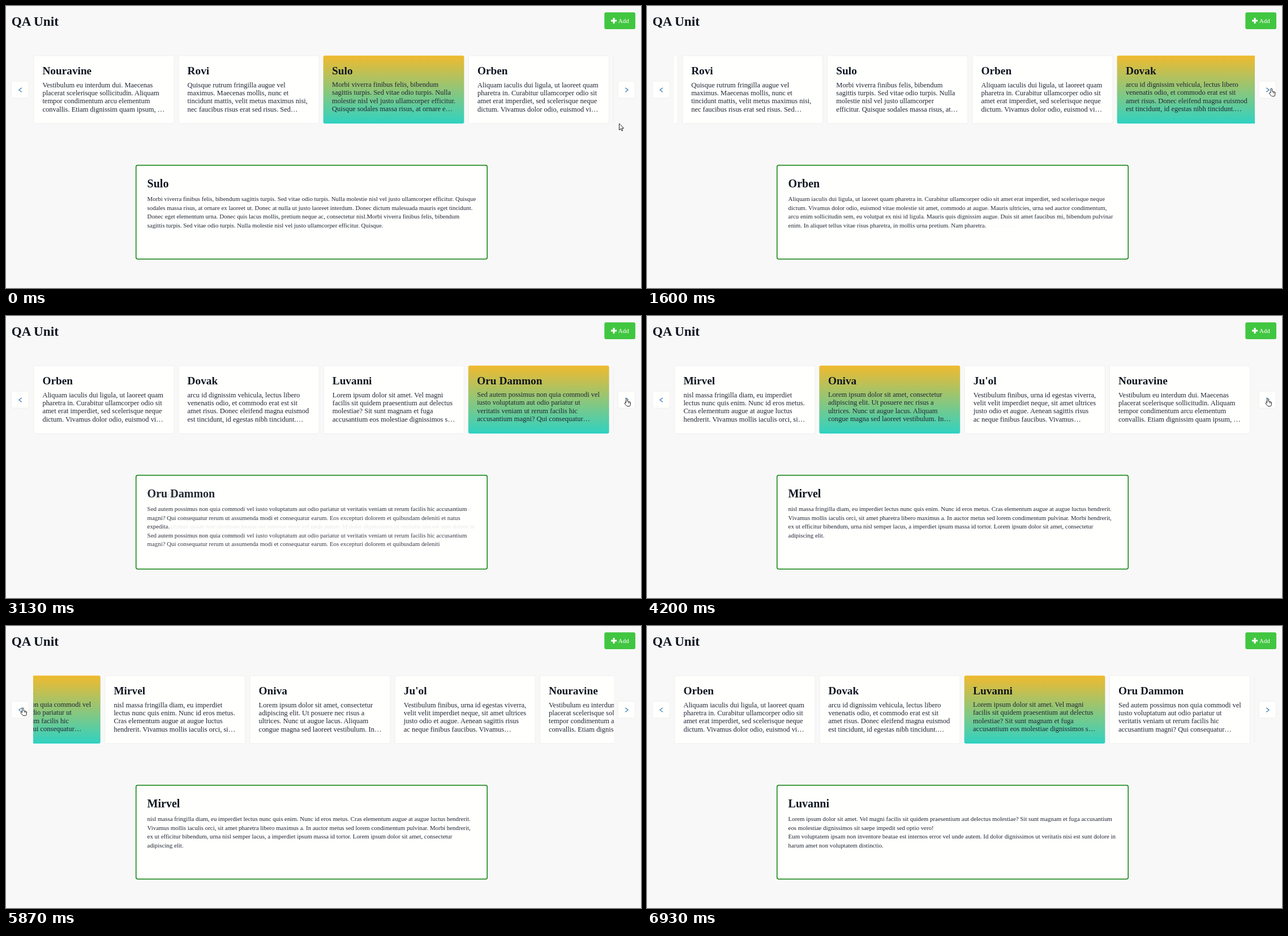
An HTML page for the animation above (6.99 s loop, 1122 by 499 pixels).

```html
<!DOCTYPE html>
<html lang="en">
<head>
<meta charset="utf-8">
<title>Card carousel</title>
<style>
html, body { margin: 0; width: 100%; height: 100%; overflow: hidden; background: #f8f8f8; }
svg { display: block; width: 1122px; height: 499px; font-family: "Liberation Serif", "Times New Roman", serif; }
text { fill: #202535; }
.title { font-weight: bold; fill: #0e1520; }
.body { font-size: 12.47px; }
.note { font-size: 10.87px; }
.box { fill: #fffffd; stroke: #efefef; }
.arrow { fill: none; stroke: #2c73b8; stroke-width: 1.1; }
.cursor { fill: #fff; stroke: #222; stroke-linejoin: round; }
</style>
</head>
<body>
<svg viewBox="0 0 1122 499">
  <defs>
    <linearGradient id="glow" x2="0" y2="1">
      <stop stop-color="#f0ba2f"/><stop offset="1" stop-color="#2fd2c2"/>
    </linearGradient>
    <clipPath id="view"><rect x="48" y="80" width="1026" height="136"/></clipPath>
  </defs>
  <rect width="1122" height="499" fill="#f8f8f8"/>
  <text class="title" x="9.8" y="35" font-size="23.2">QA Unit</text>
  <rect x="1057.3" y="11.2" width="54.7" height="29.8" rx="3" fill="#41c641"/>
  <path d="M1074 21v10M1069 26h10" stroke="#fff" stroke-width="3"/>
  <text x="1081.8" y="30" font-size="11" style="fill:#fff">Add</text>
  <g clip-path="url(#view)"><g id="track"></g></g>
  <rect class="box" x="9.5" y="133" width="30.5" height="30" rx="3"/>
  <path class="arrow" d="M27.8 144.8l-5 3.7 5 3.7"/>
  <rect class="box" x="1081" y="133" width="30.5" height="30" rx="3"/>
  <path class="arrow" d="M1094.2 144.8l5 3.7-5 3.7"/>
  <rect x="229.75" y="281.75" width="620.5" height="166" rx="3" fill="#fffffd" stroke="#0a800c" stroke-width="1.5"/>
  <g id="panel"></g>
  <g id="cursor">
    <path class="cursor" id="pointer" d="M0 0V11.5l2.7-2.5 1.8 4 1.8-.8-1.8-3.9h3.6z"/>
    <g id="hand" transform="translate(-4.3 -1)">
      <path class="cursor" d="M3 9V2.2a1.3 1.3 0 0 1 2.6 0V6l4 .9q1.6.4 1.5 2l-.6 4q-.2 1.8-1.6 1.8H5.5q-1 0-1.6-.9L.6 9.8q-.4-1 .5-1.4.9-.3 1.9.6z"/>
      <path class="cursor" d="M7.4 7v2.4M9.3 7.4v2.2" stroke-width=".8"/>
    </g>
  </g>
</svg>
<script>
const LOOP = 6990, STEP = LOOP / 105; // the picture advances 15 times a second
const PITCH = 256.2, FADE_DELAY = 30, FADE = 240, SCROLL = 288;

// name, card lines, full lines, card lines when picked (if they wrap differently)
const people = [
  ['Nouravine', 'Vestibulum eu interdum dui. Maecenas|placerat scelerisque sollicitudin. Aliquam|tempor condimentum arcu elementum|convallis. Etiam dignissim quam ipsum, …'],
  ['Rovi', 'Quisque rutrum fringilla augue vel|maximus. Maecenas mollis, nunc et|tincidunt mattis, velit metus maximus nisi,|nec faucibus risus erat sed risus. Sed…'],
  ['Sulo', 'Morbi viverra finibus felis, bibendum|sagittis turpis. Sed vitae odio turpis. Nulla|molestie nisl vel justo ullamcorper|efficitur. Quisque sodales massa risus, at…',
    'Morbi viverra finibus felis, bibendum sagittis turpis. Sed vitae odio turpis. Nulla molestie nisl vel justo ullamcorper efficitur. Quisque|sodales massa risus, at ornare ex laoreet ut. Donec at nulla ut justo laoreet interdum. Donec dictum malesuada mauris eget tincidunt.|Donec eget elementum urna. Donec quis lacus mollis, pretium neque ac, consectetur nisl.Morbi viverra finibus felis, bibendum|sagittis turpis. Sed vitae odio turpis. Nulla molestie nisl vel justo ullamcorper efficitur. Quisque.',
    'Morbi viverra finibus felis, bibendum|sagittis turpis. Sed vitae odio turpis. Nulla|molestie nisl vel justo ullamcorper efficitur.|Quisque sodales massa risus, at ornare e…'],
  ['Orben', 'Aliquam iaculis dui ligula, ut laoreet quam|pharetra in. Curabitur ullamcorper odio sit|amet erat imperdiet, sed scelerisque neque|dictum. Vivamus dolor odio, euismod vi…',
    'Aliquam iaculis dui ligula, ut laoreet quam pharetra in. Curabitur ullamcorper odio sit amet erat imperdiet, sed scelerisque neque|dictum. Vivamus dolor odio, euismod vitae molestie sit amet, commodo at augue. Mauris ultricies, urna sed auctor condimentum,|arcu enim sollicitudin sem, eu volutpat ex nisi id ligula. Mauris quis dignissim augue. Duis sit amet faucibus mi, bibendum pulvinar|enim. In aliquet tellus vitae risus pharetra, in mollis urna pretium. Nam pharetra.'],
  ['Dovak', 'arcu id dignissim vehicula, lectus libero|venenatis odio, et commodo erat est sit|amet risus. Donec eleifend magna euismod|est tincidunt, id egestas nibh tincidunt.…',
    'arcu id dignissim vehicula, lectus libero venenatis odio, et commodo erat est sit amet risus. Donec eleifend magna euismod|est tincidunt, id egestas nibh tincidunt. Mauris quis lacus mollis, pretium neque ac, consectetur nisl. Sed vitae odio turpis, ut|laoreet quam pharetra in. Duis sit amet faucibus mi, bibendum pulvinar enim. Nulla molestie nisl vel justo ullamcorper|efficitur. In aliquet tellus vitae risus pharetra, in mollis urna pretium. Nam vel faucibus augue.'],
  ['Luvanni', 'Lorem ipsum dolor sit amet. Vel magni|facilis sit quidem praesentium aut delectus|molestiae? Sit sunt magnam et fuga|accusantium eos molestiae dignissimos s…',
    'Lorem ipsum dolor sit amet. Vel magni facilis sit quidem praesentium aut delectus molestiae? Sit sunt magnam et fuga accusantium|eos molestiae dignissimos sit saepe impedit sed optio vero!|Eum voluptatem ipsam non inventore beatae est internos error vel unde autem. Id dolor dignissimos ut veritatis nisi est sunt dolore in|harum amet non voluptatem distinctio.'],
  ['Oru Dammon', 'Sed autem possimus non quia commodi vel|iusto voluptatum aut odio pariatur ut|veritatis veniam ut rerum facilis hic|accusantium magni? Qui consequatur…',
    'Sed autem possimus non quia commodi vel iusto voluptatum aut odio pariatur ut veritatis veniam ut rerum facilis hic accusantium|magni? Qui consequatur rerum ut assumenda modi et consequatur earum. Eos excepturi dolorem et quibusdam deleniti et natus|expedita.|Sed autem possimus non quia commodi vel iusto voluptatum aut odio pariatur ut veritatis veniam ut rerum facilis hic accusantium|magni? Qui consequatur rerum ut assumenda modi et consequatur earum. Eos excepturi dolorem et quibusdam deleniti'],
  ['Mirvel', 'nisl massa fringilla diam, eu imperdiet|lectus nunc quis enim. Nunc id eros metus.|Cras elementum augue at augue luctus|hendrerit. Vivamus mollis iaculis orci, si…',
    'nisl massa fringilla diam, eu imperdiet lectus nunc quis enim. Nunc id eros metus. Cras elementum augue at augue luctus hendrerit.|Vivamus mollis iaculis orci, sit amet pharetra libero maximus a. In auctor metus sed lorem condimentum pulvinar. Morbi hendrerit,|ex ut efficitur bibendum, urna nisl semper lacus, a imperdiet ipsum massa id tortor. Lorem ipsum dolor sit amet, consectetur|adipiscing elit.'],
  ['Oniva', 'Lorem ipsum dolor sit amet, consectetur|adipiscing elit. Ut posuere nec risus a|ultrices. Nunc ut augue lacus. Aliquam|congue magna sed laoreet vestibulum. In…',
    'Lorem ipsum dolor sit amet, consectetur adipiscing elit. Ut posuere nec risus a ultrices. Nunc ut augue lacus. Aliquam congue magna|sed laoreet vestibulum. In pharetra purus ultrices arcu scelerisque, eu venenatis ligula ultricies. Lorem ipsum dolor sit amet,|consectetur adipiscing elit. Mauris vel massa sed lorem pellentesque ornare pulvinar quis lacus. Donec ut lacus nec massa cursus|egestas ac nec dui. In in venenatis nunc. Integer volutpat, libero nec tristique hendrerit.'],
  ["Ju'ol", 'Vestibulum finibus, urna id egestas viverra,|velit velit imperdiet neque, sit amet ultrices|justo odio et augue. Aenean sagittis risus|ac neque finibus faucibus. Vivamus…']
];

// time, selected card, first visible card
const clicks = [
  [-999, 2, 0], [980, 3, 0], [1548, 4, 3], [2300, 5, 3], [2905, 6, 3],
  [3540, 7, 7], [4180, 8, 7], [5250, 7, 7], [5840, 6, 3], [6520, 5, 3]
];

// time, x, y of the cursor's hot spot
const path = [
  [0, 1083.5, 208], [70, 1083.5, 208], [600, 1103.3, 146], [1730, 1103.3, 146],
  [2200, 1096.8, 146], [4450, 1096.8, 146], [5050, 29.8, 145], [LOOP, 29.8, 145]
];
const CURSOR_END = 6870;

const $ = id => document.getElementById(id);
const clamp = v => Math.max(0, Math.min(1, v));
const smooth = p => p * p * (3 - 2 * p);
const easeOut = p => 1 - (1 - p) ** 2;
const mix = (a, b, p) => a + (b - a) * p;

function add(parent, tag, attrs = {}, content = '') {
  const el = document.createElementNS('http://www.w3.org/2000/svg', tag);
  for (const k in attrs) el.setAttribute(k, attrs[k]);
  el.textContent = content;
  return parent.appendChild(el);
}

function addLines(parent, lines, cls, x, y, step) {
  lines.split('|').forEach((s, i) => add(parent, 'text', { class: cls, x, y: y + i * step }, s));
}

function makeFace(parent, name, lines, lit) {
  const g = add(parent, 'g');
  const d = lit ? 0.7 : 0;
  add(g, 'rect', lit
    ? { x: 0.2, y: 87.7, width: 248.8, height: 120.4, rx: 3, fill: 'url(#glow)' }
    : { x: 0.8, y: 88, width: 248, height: 120, rx: 2, class: 'box' });
  add(g, 'text', { class: 'title', 'font-size': 19.3, x: 16.4 - d, y: 121.4 - d }, name);
  addLines(g, lines, 'body', 16.4 - d, 143.8 - d, 14.24);
  return g;
}

const cards = Array.from({ length: 11 }, (_, i) => {
  const [name, brief, , litBrief] = people[i % people.length];
  const g = add($('track'), 'g', { transform: `translate(${48 + i * PITCH} 0)` });
  return [makeFace(g, name, brief, false), makeFace(g, name, litBrief || brief, true)];
});

const notes = people.map(([name, , full]) => {
  const g = add($('panel'), 'g');
  add(g, 'text', { class: 'title', 'font-size': 20.05, x: 249.6, y: 321.3 }, name);
  if (full) addLines(g, full, 'note', 249.6, 345, 15.6);
  return g;
});

const show = (el, on) => { el.style.display = on ? '' : 'none'; };

function drawCursor(t) {
  const i = path.findIndex(k => k[0] > t);
  const [a, b] = [path[i - 1], path[i]];
  const p = smooth((t - a[0]) / (b[0] - a[0]));
  const x = mix(a[1], b[1], p), y = mix(a[2], b[2], p);
  const over = y < 163 && (x < 40 || x > 1081);
  $('cursor').setAttribute('transform', `translate(${x} ${y})`);
  show($('cursor'), t < CURSOR_END);
  show($('hand'), over);
  show($('pointer'), !over);
}

function draw(t) {
  const n = clicks.filter(c => c[0] <= t).length - 1;
  const [at, picked, first] = clicks[n];
  const [, prev, prevFirst] = clicks[Math.max(0, n - 1)];
  const offset = mix(prevFirst, first, easeOut(clamp((t - at) / SCROLL)));
  const fade = smooth(clamp((t - at - FADE_DELAY) / FADE));

  $('track').setAttribute('transform', `translate(${-offset * PITCH} 0)`);
  cards.forEach(([plain, lit], i) => {
    show(plain, i !== picked);
    show(lit, i === picked);
  });
  notes.forEach((g, i) => {
    g.style.opacity = i === picked ? fade : i === prev ? 1 - fade : 0;
  });
  drawCursor(t);
}

const start = performance.now();
function tick() {
  const t = (performance.now() - start) % LOOP;
  draw(Math.floor(t / STEP) * STEP);
  requestAnimationFrame(tick);
}
tick();
</script>
</body>
</html>
```
